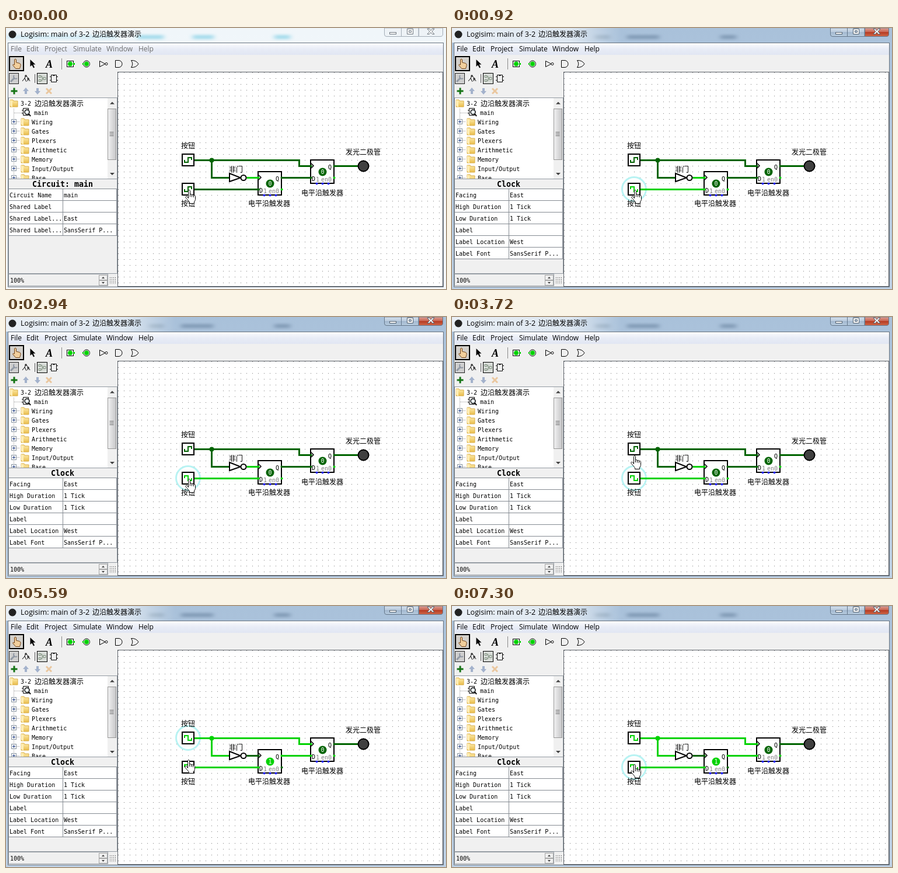
An HTML page for the animation above (8000 ms loop, 754 by 447 pixels).

```html
<!DOCTYPE html>
<html lang="zh">
<head>
<meta charset="utf-8">
<title>Edge-triggered flip-flop</title>
<style>
html, body { margin: 0; width: 100%; height: 100%; overflow: hidden; background: #fff; }
svg { display: block; }
text { white-space: pre; }
.ui { font: 12px "Open Sans", sans-serif; }
.cjk { font: 12px "Noto Sans CJK SC", "Noto Sans CJK", sans-serif; }
.mono { font: 10px "DejaVu Sans Mono", monospace; }
.head { font: bold 13.3px "DejaVu Sans Mono", monospace; text-anchor: middle; }
.menu { fill: #000; }
.idle .menu { fill: #6d6d6d; }
.idle .active, svg:not(.idle) .inactive { display: none; }
.line { fill: none; stroke: #000; stroke-width: 2; }
.thin { fill: none; stroke: #000; }
.wire { fill: none; stroke-width: 3; }
.clk1 { stroke: var(--clk1); } .clk2 { stroke: var(--clk2); }
.inv { stroke: var(--inv); } .q1 { stroke: var(--q1); } .low { stroke: #006400; }
</style>
</head>
<body>
<svg id="stage" width="754" height="447" viewBox="0 0 754 447"></svg>
<script>
const LOW = '#006400', HIGH = '#00d200', LOOP = 8000;
const stage = document.getElementById('stage');

const rect = (x, y, w, h, fill, stroke = 'none') =>
  `<rect x="${x}" y="${y}" width="${w}" height="${h}" fill="${fill}" stroke="${stroke}"/>`;
const path = (d, cls, more = '') => `<path d="${d}" class="${cls}" ${more}/>`;
const fillPath = (d, fill, stroke = 'none') => `<path d="${d}" fill="${fill}" stroke="${stroke}"/>`;
const disc = (x, y, r, fill, more = '') => `<circle cx="${x}" cy="${y}" r="${r}" fill="${fill}" ${more}/>`;
const text = (x, y, s, cls, more = '') => `<text x="${x}" y="${y}" class="${cls}" ${more}>${s}</text>`;
const gradient = (id, ...stops) => `<linearGradient id="${id}" x2="0" y2="1">` +
  stops.map(([at, color]) => `<stop offset="${at}" stop-color="${color}"/>`).join('') + '</linearGradient>';
const blur = (x, y, w, fill) =>
  `<rect x="${x}" y="${y}" width="${w}" height="7" fill="${fill}" filter="url(#soft)"/>`;

const defs = `<defs>
  ${gradient('glass', [0, '#a9c1da'], [1, '#bdd0e4'])}
  ${gradient('pale', [0, '#f0f6fa'], [1, '#f5f9fc'])}
  ${gradient('menubar', [0, '#fbfcfe'], [.5, '#e8ecf6'], [1, '#e1e6f3'])}
  ${gradient('btn', [0, '#d4e0ec'], [.5, '#b9cadd'], [.5, '#a2b7ce'], [1, '#b8cde0'])}
  ${gradient('close', [0, '#dca095'], [.5, '#c8604d'], [.5, '#b53a22'], [1, '#d0694a'])}
  ${gradient('folder', [0, '#ffeeb0'], [1, '#e9bd4c'])}
  <linearGradient id="thumb"><stop stop-color="#f2f2f2"/><stop offset="1" stop-color="#c6c6c8"/></linearGradient>
  <linearGradient id="glow"><stop stop-color="#fff" stop-opacity=".75"/>
    <stop offset=".7" stop-color="#fff" stop-opacity=".6"/><stop offset="1" stop-color="#fff" stop-opacity="0"/></linearGradient>
  <filter id="soft" x="-30%" y="-150%" width="160%" height="400%"><feGaussianBlur stdDeviation="4 2"/></filter>
  <pattern id="grid" width="10" height="10" patternUnits="userSpaceOnUse">${rect(2, 6, 1, 1, '#777')}</pattern>
  <clipPath id="treeClip"><rect x="5" y="120" width="169" height="138"/></clipPath>
</defs>`;

function titleBar() {
  const buttons = (fill, close, edge, mark) =>
    fillPath('M648.5 0V11Q648.5 14.5 652 14.5H707V0Z', fill, edge) +
    fillPath('M707.5 0V14.5H744Q748.5 14.5 748.5 11V0Z', close, edge) +
    path('M677.5 0V14', '', `stroke="${edge}"`) +
    rect(657.5, 7.5, 11, 3, '#fff', mark) +
    `<path d="M687.5 1.5h10v9h-10zM690.5 4.5h4v3h-4z" fill="#fff" fill-rule="evenodd" stroke="${mark}"/>` +
    fillPath('M722 1.5h3.5l2.5 3 2.500-3h3.500l-4 4.500 4 4.500h-3.500l-2.500-3-2.500 3h-3.500l4-4.500z', '#fff', mark);
  return `<g class="active">${rect(0, 0, 754, 447, 'url(#glass)')}
      ${blur(245, 12, 25, '#8ea7bf')}${blur(300, 12, 55, '#849db8')}${blur(460, 12, 27, '#849db8')}
      ${rect(0, 0, 290, 25, 'url(#glow)')}${buttons('url(#btn)', 'url(#close)', '#64768a', '#52606e')}</g>
    <g class="inactive">${rect(0, 0, 754, 447, 'url(#pale)')}
      ${blur(0, 12, 190, '#d4ebf5')}${blur(225, 12, 45, '#a5dcec')}${blur(320, 12, 36, '#a5dcec')}${blur(460, 12, 27, '#a5dcec')}
      ${buttons('#eef3f7', '#eef3f7', '#a3adb7', '#6c747c')}</g>
    ${disc(11, 11, 6.500, '#222')}
    ${text(25, 15, 'Logisim: main of 3-2', 'ui', 'style="font-size:12.6px"')}
    ${text(148, 15, '边沿触发器演示', 'cjk')}`;
}

function menuAndTools() {
  const menus = [[8, 'File'], [35, 'Edit'], [66, 'Project'], [115, 'Simulate'], [172, 'Window'], [227, 'Help']];
  return rect(3.5, 25.5, 746, 418, '#f0f0f0', '#68727d') + rect(4, 26, 745, 20, 'url(#menubar)') +
    menus.map(([x, s]) => text(x, 40, s, 'ui menu')).join('') +
    rect(6, 49, 24, 24, '#d3d0cb', '#000').replace('/>', ' stroke-width="2"/>') +
    fillPath('M14.500 62V54q1.500-2 3 0v5l6 1.500q2 1 1.500 4l-1.500 5h-7l-5-6q0-2 3-.500z', '#f2cf9c', '#74451b') +
    fillPath('M41.500 54v12l3-2.500 2.500 5 2-1-2.500-5h4z', '#000') +
    text(68, 68, 'A', '', 'style="font:italic bold 18px \'Liberation Serif\',serif"') +
    path('M95.500 52V71', '', 'stroke="#888"') +
    rect(104.500, 56.500, 11, 10, '#fff', '#000') + disc(110, 61.500, 4, HIGH) + rect(115, 60, 3, 3, HIGH) +
    disc(138, 61.500, 5.500, '#fff', 'stroke="#000"') + disc(138, 61.500, 4, HIGH) + rect(131, 60, 2, 3, HIGH) +
    path('M160.500 56.500L170 61.500L160.500 66.500Z', 'thin') + disc(172, 61.500, 2, '#fff', 'stroke="#000"') +
    path('M187.500 55.500H193a6 6 0 0 1 0 12H187.500Z', 'thin') +
    path('M214.500 55.500Q223 55 227 61.500Q223 68 214.500 67.500Q219 61.500 214.500 55.500Z', 'thin') +
    // explorer tools
    rect(5.500, 77.500, 16, 18, '#cfcfcf', '#222') + path('M8 92L15 85', '', 'stroke="#929aa6" stroke-width="3"') +
    path('M14 81a3.500 3.500 0 1 0 5 5', '', 'fill="none" stroke="#929aa6" stroke-width="2"') +
    path('M28 91l4-5 3 6M32 86l2-5 4 5 3 5M38 86l-1 5', 'thin') + disc(34, 82, 1.800, '#333') + disc(38, 87, 1.800, '#333') +
    path('M49.500 79V94', '', 'stroke="#555"') + rect(53.500, 77.500, 17, 18, '#d8dcd8', '#000') +
    path('M56 81.500h4v3h-4zM56 88.500h4v3h-4zM64 84.500h4v4h-4zM60 83h2v3h2M60 90h2v-3h2', '', 'fill="none" stroke="#7f917f"') +
    path('M77.500 80.500h9v12h-9zM80 80.500q2 3 4 0M75 83.500h2M75 89.500h2M87 83.500h2M87 89.500h2', 'thin') +
    path('M14 102.500V113.500M8.500 108H19.500', '', 'stroke="#147314" stroke-width="3"') +
    fillPath('M34 102l5 6h-3v5h-4v-5h-3z', '#a3b2cc') + fillPath('M54 114l5-6h-3v-5h-4v5h-3z', '#a3b2cc') +
    path('M69 103.500l9 9M78 103.500l-9 9', '', 'stroke="#eac79f" stroke-width="3"');
}

function tree() {
  const folder = (x, y) => fillPath(`M${x} ${y - 6}h5l1 2h7v10h-13z`, 'url(#folder)', '#d9ad47') +
    fillPath(`M${x} ${y - 6}l4 3v10l-4-3z`, '#ffedb4');
  const rows = ['Wiring', 'Gates', 'Plexers', 'Arithmetic', 'Memory', 'Input/Output', 'Base'].map((name, i) => {
    const y = 161 + 16 * i;
    return path(`M18 ${y - .5}H24`, '', 'stroke="#999" stroke-dasharray="1 1"') +
      rect(9.500, y - 4.500, 8, 8, '#f6f6f6', '#8b97a3') +
      path(`M11 ${y - .5}h5M13.500 ${y - 3}v5`, '', 'stroke="#28458a"') +
      folder(26, y) + text(44, y + 4, name, 'mono');
  }).join('');
  return rect(4.500, 119.500, 186, 139, '#fff', '#9299a1') +
    `<g clip-path="url(#treeClip)">${path('M13.500 138V258', '', 'stroke="#999" stroke-dasharray="1 1"')}
      ${folder(7, 129)}${text(25, 133, '3-2', 'mono')}${text(49, 133.5, '边沿触发器演示', 'cjk')}
      ${path('M14 145.500H28', '', 'stroke="#999" stroke-dasharray="1 1"')}
      ${path('M29.500 137.500h9v12h-9zM27 141h2M27 146h2', 'thin')}
      ${disc(36, 144, 4, '#e8f1f5', 'stroke="#000" stroke-width="1.5"')}
      ${path('M39 147l3 4', 'line')}${text(48, 149, 'main', 'mono')}${rows}</g>` +
    rect(174, 120, 16, 138, '#f0f0f0') + rect(174.500, 138.500, 14, 87, 'url(#thumb)', '#979797') +
    path('M177.500 178.500h7M177.500 181.500h7M177.500 184.500h7', '', 'stroke="#666"') +
    fillPath('M178 130.500l4-4 4 4z', '#404040') + fillPath('M178 248l4 4 4-4z', '#404040');
}

function properties(cls, title, rows) {
  const cells = rows.map(([key, value], i) => {
    const y = 276 + 20 * i;
    return rect(4.500, y - .5, 93, 20, '#fff', '#858b92') + rect(97.500, y - .5, 92, 20, '#fff', '#858b92') +
      text(6, y + 14, key, 'mono') + text(99, y + 14, value, 'mono');
  }).join('');
  return `<g class="${cls}">${text(97, 272, title, 'head')}${cells}</g>`;
}

function sidebar() {
  let dots = '';
  for (let x = 178; x < 189; x += 3) for (let y = 427; y < 439; y += 3) dots += rect(x, y, 1, 1, '#333');
  return tree() +
    properties('inactive', 'Circuit: main', [['Circuit Name', 'main'], ['Shared Label', ''],
      ['Shared Label...', 'East'], ['Shared Label...', 'SansSerif P...']]) +
    properties('active', 'Clock', [['Facing', 'East'], ['High Duration', '1 Tick'], ['Low Duration', '1 Tick'],
      ['Label', ''], ['Label Location', 'West'], ['Label Font', 'SansSerif P...']]) +
    path('M4.500 259V420.500H190.500V259', '', 'fill="none" stroke="#9299a1"') +
    rect(4.500, 421.500, 170, 20, '#f0f0f0', '#9aa1a8') + text(7, 436, '100%', 'mono') +
    rect(159.500, 423.500, 14, 8, '#f0f0f0', '#a6a6a6') + rect(159.500, 432.500, 14, 8, '#f0f0f0', '#a6a6a6') +
    fillPath('M164 429l2.500-3 2.500 3z', '#444') + fillPath('M164 435l2.500 3 2.500-3z', '#444') + dots;
}

const clockBox = (y, id) => rect(302, y - 10, 20, 20, '#fff', '#000').replace('/>', ' stroke-width="2"/>') +
  `<path id="${id}" class="${id}" fill="none" stroke-width="2"/>`;

// A low-enabled D latch whose corner is at (x, y).
function latch(x, y, name, q, notQ, d, enable) {
  const port = (dx, dy, color) => `<circle cx="${x + dx + .5}" cy="${y + dy + .5}" r="2" style="fill:${color}"/>`;
  return rect(x, y, 40, 40, '#fff', '#000').replace('/>', ' stroke-width="2"/>') +
    path(`M${x + 1} ${y + 6}l4 4-4 4`, 'line', 'style="stroke-width:1.5"') +
    text(x + 30, y + 16, 'Q', 'mono') + text(x + 2, y + 36, 'D', 'mono') +
    text(x + 9, y + 37, '1', 'mono', 'fill="#808080"') + text(x + 18, y + 37, 'en0', 'mono', 'fill="#808080"') +
    `<circle cx="${x + 20.5}" cy="${y + 20.5}" r="7" style="fill:${q}"/>` +
    text(x + 20.5, y + 24, '0', 'mono', `id="${name}" fill="#fff" text-anchor="middle"`) +
    [10, 20, 30].map(dx => port(dx, 40, '#2828ff')).join('') +
    port(0, 10, enable) + port(0, 30, d) + port(40, 10, q) + port(40, 30, notQ);
}

function circuit() {
  const labels = [[300, 206, '按钮'], [300, 305, '按钮'], [382, 247, '非门'], [415, 305, '电平沿触发器'],
    [506, 287, '电平沿触发器'], [582, 217, '发光二极管']];
  return rect(191.500, 75.500, 557, 367, '#fff', '#5d636a') + rect(192, 76, 557, 367, 'url(#grid)') +
    `<circle id="halo" cx="312" r="20.5" fill="none" stroke="#b8f3f3" stroke-width="3"/>
    <g transform="translate(.5 .5)">
      ${path('M322 226H502V236H522M352 226V256H382', 'wire clk1')}
      <circle cx="352" cy="226" r="4" style="fill:var(--clk1)"/>
      ${path('M412 256H432', 'wire inv')}${path('M322 276H432', 'wire clk2')}
      ${path('M472 256H522', 'wire q1')}${path('M562 236H603', 'wire low')}
    </g>` +
    clockBox(226, 'clk1') + clockBox(276, 'clk2') +
    path('M383 249L402 256.500L383 263Z', 'line', 'style="fill:#fff"') + disc(407, 256.500, 4.500, '#fff', 'stroke="#000" stroke-width="2"') +
    latch(432, 246, 'bit1', 'var(--q1)', 'var(--notq1)', 'var(--clk2)', 'var(--inv)') +
    latch(522, 226, 'bit2', LOW, HIGH, 'var(--q1)', 'var(--clk1)') +
    disc(612.500, 236.500, 9, '#404040', 'stroke="#000" stroke-width="2"') +
    labels.map(([x, y, s]) => text(x, y, s, 'cjk')).join('');
}

const hand = `<g id="hand" stroke="#000">${fillPath(
  'M5.500 14.500V2.200C5.500 0 8.500 0 8.500 2.200V8.500C9 7 11.300 7.500 11.500 9C12 8 14.200 8 14.500 10' +
  'C15.300 9 17.500 9.500 17.500 11.500V16.500C17.500 18.500 16 19.500 15.500 21V23.500H7.500V21.500C6 19 3 16 1 13.500C0 11.500 2.500 10.500 3.800 12Z',
  '#fff', '#000')}${path('M8.500 8.500V12M11.500 9V12.500M14.500 10V13', 'thin')}</g>`;

stage.innerHTML = defs + titleBar() + menuAndTools() + sidebar() + circuit() + hand;
const part = Object.fromEntries([...stage.querySelectorAll('[id]')].map(el => [el.id, el]));

// Nine discrete pointer steps that slow down towards the end.
function travel(t, start, end) {
  if (t < start) return 0;
  const step = Math.min(9, 1 + Math.floor((t - start) / (end - start) * 8 + 1e-6));
  return 1 - (1 - step / 9) ** 2.8;
}

function wave(y, high) {
  const a = high ? -4 : 4;
  return `M306 ${y}v${a}h6v${-2 * a}h6v${a}`;
}

function draw(t) {
  const within = (from, to) => t >= from && t < to;
  const clk1 = t >= 4650;
  const clk2 = within(920, 2160) || within(2940, 6520) || t >= 7300;
  const q1 = clk1 && clk2;
  const signals = { clk1, clk2, inv: !clk1, q1, notq1: !q1 };
  for (const name in signals) stage.style.setProperty('--' + name, signals[name] ? HIGH : LOW);
  part.clk1.setAttribute('d', wave(226, clk1));
  part.clk2.setAttribute('d', wave(276, clk2));
  part.bit1.textContent = +q1;

  stage.classList.toggle('idle', t < 70);
  part.halo.setAttribute('cy', within(4420, 6370) ? 226 : 276);
  part.halo.style.display = t < 70 ? 'none' : '';

  const up = travel(t, 3490, 4100), down = travel(t, 5350, 5970);
  const y = Math.round(277 - 50 * up + 44 * down);
  part.hand.setAttribute('transform', `translate(${t < 3490 ? 307 : 306} ${y})`);
}

const start = performance.now();
function tick() {
  draw((performance.now() - start) % LOOP);
  requestAnimationFrame(tick);
}
tick();
</script>
</body>
</html>
```
